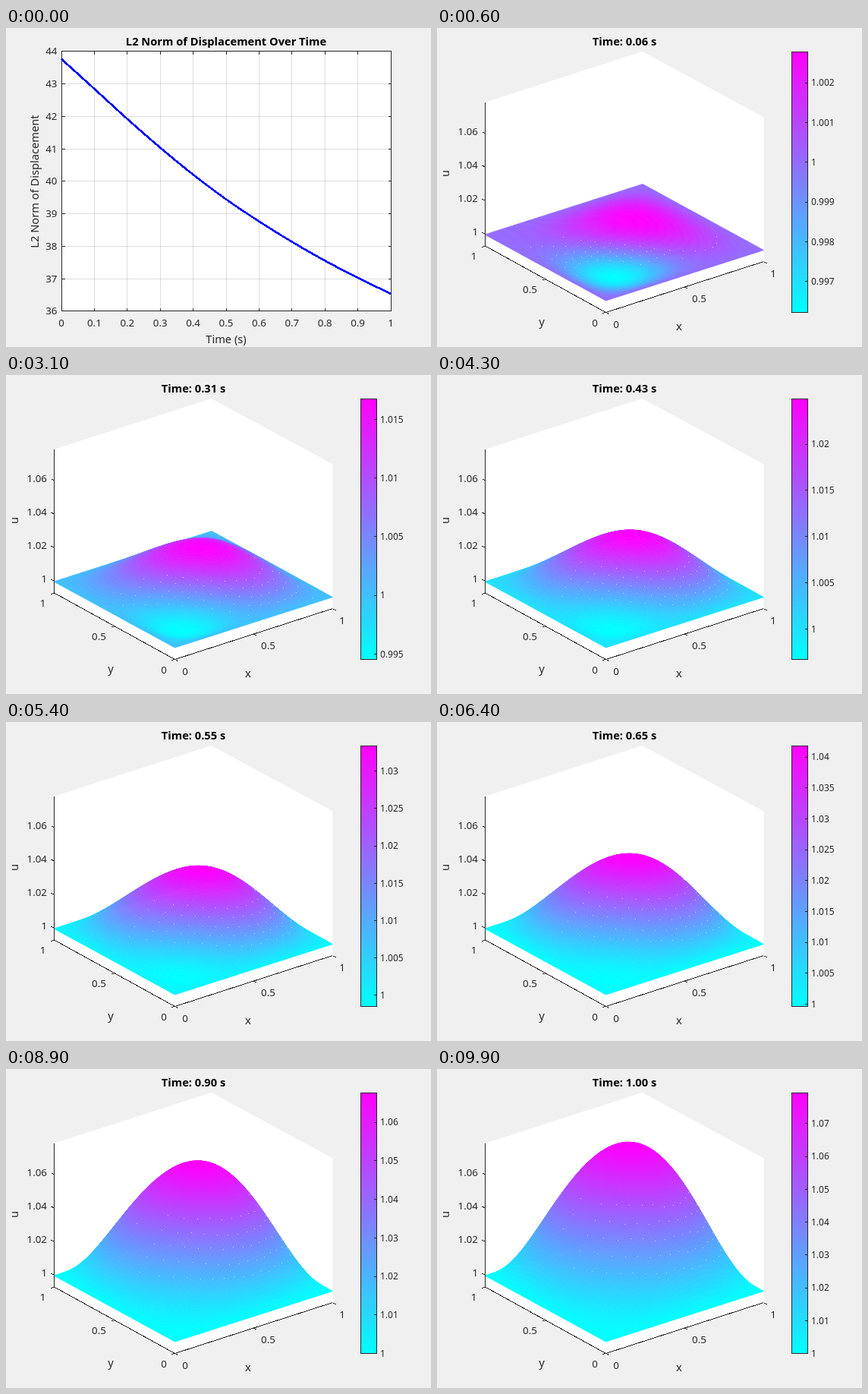
An HTML page with a canvas that plays this animation: 560 px wide and 420 px high, repeating every 10000 ms.

```html
<!DOCTYPE html>
<html lang="en">
<head>
<meta charset="utf-8">
<title>Displacement</title>
<style>
  html, body { margin: 0; width: 560px; height: 420px; overflow: hidden; background: #f0f0f0; }
  canvas, svg { position: absolute; left: 0; top: 0; display: block; }
  text { font-family: "Noto Sans", "Open Sans", sans-serif; font-size: 13.33px; fill: #262626; }
  .label { font-size: 14.67px; }
  .title { font-size: 14.67px; font-weight: bold; fill: #000; }
  .small { font-size: 12px; }
  line, polyline, rect, path { shape-rendering: crispEdges; }
</style>
</head>
<body>
<canvas id="surface" width="560" height="420"></canvas>
<svg id="stage" width="560" height="420" viewBox="0 0 560 420">
  <defs>
    <linearGradient id="cool" x1="0" y1="0" x2="0" y2="1">
      <stop offset="0" stop-color="#f0f"/><stop offset="1" stop-color="#0ff"/>
    </linearGradient>
  </defs>
  <g id="plot"></g>
  <g id="scene"><g id="axes"></g><g id="bar"></g></g>
</svg>
<script>
const FRAME = 100, FRAMES = 100;
const INK = "#262626";
const $ = id => document.getElementById(id);
const plot = $("plot"), scene = $("scene"), axes = $("axes"), bar = $("bar");
const canvas = $("surface"), ctx = canvas.getContext("2d");

function add(parent, tag, attrs, content) {
  const el = document.createElementNS("http://www.w3.org/2000/svg", tag);
  for (const key in attrs) el.setAttribute(key, attrs[key]);
  if (content !== undefined) el.textContent = content;
  parent.appendChild(el);
  return el;
}
const line = (g, x1, y1, x2, y2, stroke = INK) =>
  add(g, "line", { x1, y1, x2, y2, stroke });
const text = (g, s, x, y, anchor = "middle", cls = "") =>
  add(g, "text", { x, y, "text-anchor": anchor, class: cls }, s);
const upright = (g, s, x, y) =>
  text(g, s, 0, 0, "middle", "label").setAttribute("transform", `translate(${x} ${y}) rotate(-90)`);

// Smooth curve through the points (ts, vs).
function spline(ts, vs, t) {
  const last = ts.length - 1;
  let i = 0;
  while (i < last - 1 && t > ts[i + 1]) i++;
  const slope = j => {
    const a = Math.max(0, j - 1), b = Math.min(last, j + 1);
    return (vs[b] - vs[a]) / (ts[b] - ts[a]);
  };
  const h = ts[i + 1] - ts[i], s = (t - ts[i]) / h, r = 1 - s;
  return vs[i] * r * r * (1 + 2 * s) + vs[i + 1] * s * s * (3 - 2 * s) +
    h * s * r * (slope(i) * r - slope(i + 1) * s);
}

// ---- Line plot ----
function buildPlot() {
  const L = 73, R = 507, T = 30.99, B = 372.99;
  const px = v => L + (R - L) * v, py = v => B - (B - T) * (v - 36) / 8;
  const snap = v => Math.floor(v) + .5;
  const col = v => snap(px(v)), row = v => snap(py(v));
  const left = snap(L), right = snap(R), top = snap(T), bottom = snap(B);
  const norm = [43.77, 42.85, 41.925, 41.04, 40.21, 39.45, 38.77, 38.14, 37.56, 37.03, 36.54];
  const steps = norm.map((_, i) => i / 10);
  const box = { x: left, y: top, width: right - left, height: bottom - top };
  add(plot, "rect", { ...box, fill: "#fff" });
  const grid = "rgba(38,38,38,.15)";
  steps.forEach(v => line(plot, col(v), top, col(v), bottom, grid));
  for (let v = 36; v <= 44; v++) line(plot, left, row(v), right, row(v), grid);
  add(plot, "rect", { ...box, fill: "none", stroke: INK });
  steps.forEach(v => {
    line(plot, col(v), bottom, col(v), bottom - 4);
    line(plot, col(v), top, col(v), top + 4);
    text(plot, String(v), px(v), 393);
  });
  for (let v = 36; v <= 44; v++) {
    line(plot, left, row(v), left + 4, row(v));
    line(plot, right, row(v), right - 4, row(v));
    text(plot, String(v), 67.5, row(v) + 4.5, "end");
  }
  let d = "";
  for (let i = 0; i <= 100; i++) {
    const v = i / 100;
    d += (i ? "L" : "M") + px(v).toFixed(2) + " " + py(spline(steps, norm, v)).toFixed(2);
  }
  add(plot, "path", { d, fill: "none", stroke: "#00f", "stroke-width": 2.67 });
  text(plot, "L2 Norm of Displacement Over Time", 290, 23, "middle", "title");
  text(plot, "Time (s)", 290, 415, "middle", "label");
  upright(plot, "L2 Norm of Displacement", 43, 202);
}

// ---- Fixed parts of the 3D view ----
const SCALE = 2200;
const project = (x, y, w) => [222.5 + 208 * x - 159.5 * y, 359 - 66.5 * x - 87 * y - SCALE * w];
let title;

function buildAxes() {
  add(axes, "polyline", { points: "63.5,98 63.5,287 222.5,374.5 430.5,307.5", fill: "none", stroke: INK });
  [0, .5, 1].forEach((v, i) => {
    const [ax, ay] = project(v, 0, 0), [bx, by] = project(0, v, 0);
    line(axes, ax, ay + 15.3, ax + 4, ay + 17.5);
    line(axes, bx, by + 15.3, bx - 4, by + 16.6);
    text(axes, String(v), [236, 345.5, 443][i], [395, 361, 328][i]);
    text(axes, String(v), [208, 122.5, 48.5][i], [392.5, 349, 305][i]);
  });
  [1, 1.02, 1.04, 1.06].forEach((v, i) => {
    const y = 271.4 - 44.2 * i;
    line(axes, 63.5, y, 59.5, y - 2);
    text(axes, String(v), 54, y + 1.8, "end");
  });
  text(axes, "x", 319, 398, "middle", "label");
  text(axes, "y", 138, 392, "middle", "label");
  upright(axes, "u", 15.5, 191.5);
  title = text(axes, "", 247, 23, "middle", "title");
  add(axes, "rect", { x: 467.5, y: 31.5, width: 21, height: 343, fill: "url(#cool)", stroke: INK });
}

function drawBar(lo, hi) {
  bar.textContent = "";
  const range = hi - lo;
  let step = 0;
  for (let mag = 1e-5; !step; mag *= 10)
    step = [1, 2, 5].map(n => n * mag).find(s => range / s <= 9.5) || 0;
  for (let n = Math.ceil(lo / step - .02); n * step <= hi + 1e-9; n++) {
    const y = Math.min(374.5, 374.5 - 343 * (n * step - lo) / range);
    line(bar, 484.5, y, 488.5, y);
    text(bar, String(+(1 + n * step).toFixed(6)), 493, y + 4.3, "start", "small");
  }
}

// ---- Surface ----
const KEYS = [0, .0606, .2121, .4343, .6465, .7879, 1];
const BASE = [0, .0013, .0069, .0206, .0374, .0511, .0754];
const TILT = [0, -.0062, -.0162, -.0247, -.0315, -.0345, -.04];
const BEND = [0, -.0054, -.0093, -.0102, -.0125, -.016, -.022];
const CUBE = [0, -.005, -.0108, -.0064, 0, 0, 0];
const N = 84;

// A sine bump times a polynomial along (m) and across (n) the diagonal.
function shapeAt(t) {
  const [a, b, c, d] = [BASE, TILT, BEND, CUBE].map(vs => spline(KEYS, vs, t));
  const fan = .42 * a, skew = .12 * b;
  return (x, y) => {
    const cx = Math.cos(Math.PI * x), cy = Math.cos(Math.PI * y);
    const m = (cx + cy) / 2, n = (cx - cy) / 2;
    return Math.sin(Math.PI * x) * Math.sin(Math.PI * y) *
      (a + m * (b + m * (c + m * d)) + n * (skew + n * fan));
  };
}

function drawSurface(t) {
  const w = shapeAt(t), pts = [];
  let lo = 0, hi = 0;
  for (let i = 0; i <= N; i++) {
    pts.push([]);
    for (let j = 0; j <= N; j++) {
      const v = w(i / N, j / N);
      lo = Math.min(lo, v);
      hi = Math.max(hi, v);
      pts[i].push([...project(i / N, j / N, v), v]);
    }
  }
  ctx.fillStyle = "#fff";
  fill([[63, 98], [270.5, 31], [430.5, 117.5], [430.5, 308], [222.5, 374.5], [63, 287.5]]);
  ctx.lineWidth = .7;
  ctx.lineJoin = "round";
  for (let i = N - 1; i >= 0; i--)
    for (let j = N - 1; j >= 0; j--) {
      const quad = [pts[i][j], pts[i + 1][j], pts[i + 1][j + 1], pts[i][j + 1]];
      const mean = quad.reduce((s, p) => s + p[2], 0) / 4;
      const c = Math.max(0, Math.min(255, Math.round(255 * (mean - lo) / (hi - lo))));
      ctx.fillStyle = ctx.strokeStyle = `rgb(${c},${255 - c},255)`;
      fill(quad);
      ctx.stroke();
    }
  drawSpecks(w, lo, hi);
  drawBar(lo, hi);
}

function fill(points) {
  ctx.beginPath();
  points.forEach(p => ctx.lineTo(p[0], p[1]));
  ctx.closePath();
  ctx.fill();
}

// Pale pixels where mesh lines cross a few colour levels on the near slope.
function drawSpecks(w, lo, hi) {
  ctx.fillStyle = "#d6d6ea";
  const level = (x, y) => (w(x, y) - lo) / (hi - lo);
  for (let i = 2; i < 20; i++)
    for (const cut of [.28, .38, .48, .58, .68]) {
      const x = i / 21;
      for (let y = .04; y < .8; y += .01)
        if (level(x, y) < cut && level(x, y + .01) >= cut) {
          const p = project(x, y + .005, w(x, y + .005));
          ctx.fillRect(Math.round(p[0]), Math.round(p[1]), 1, 1);
          break;
        }
    }
}

// ---- Playback ----
let shown = -1;
function show(k) {
  if (k === shown) return;
  shown = k;
  plot.style.display = k ? "none" : "";
  scene.style.display = k ? "" : "none";
  ctx.clearRect(0, 0, 560, 420);
  if (!k) return;
  const t = k / (FRAMES - 1);
  title.textContent = `Time: ${t.toFixed(2)} s`;
  drawSurface(t);
}

buildPlot();
buildAxes();
const start = performance.now();
function tick() {
  show(Math.floor((performance.now() - start) / FRAME) % FRAMES);
  requestAnimationFrame(tick);
}
tick();
</script>
</body>
</html>
```
